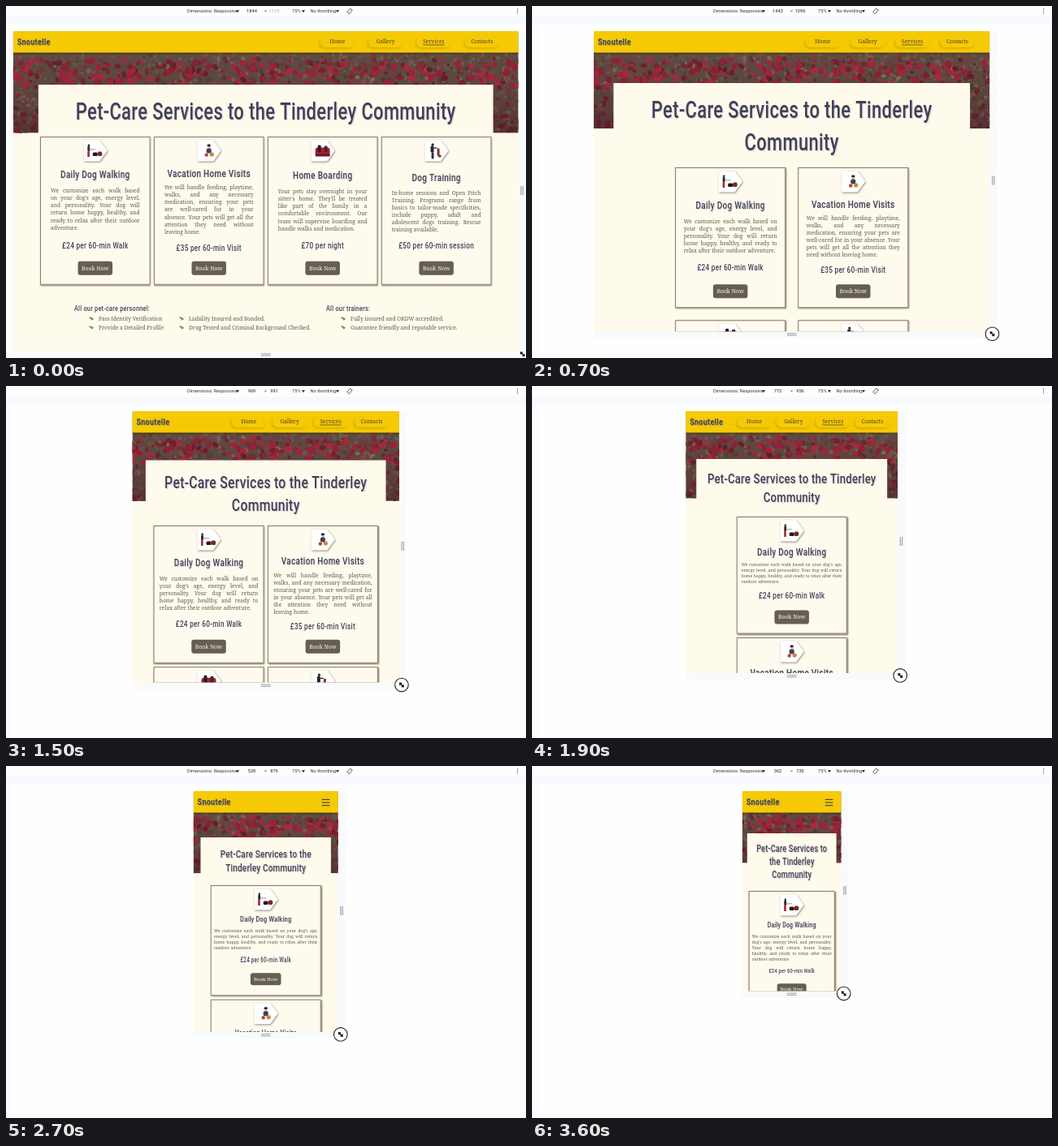
Write an HTML page with a canvas that moves like this. It is 640x434 px and loops after 3.7 s.

```html
<!DOCTYPE html>
<html lang="en">
<head>
<meta charset="utf-8">
<title>Responsive page resize</title>
<style>
html, body { margin: 0; width: 100%; height: 100%; overflow: hidden; background: #fff; }
canvas { display: block; width: 640px; height: 434px; }
</style>
</head>
<body>
<canvas id="stage"></canvas>
<script>
const STEP = 100, STEPS = 37, TOP = 31, MID = 319.7;
const INK = '#41405a', BODY = '#5f5949', CREAM = '#fefaec', YELLOW = '#f5ca05';
const SERIF = '"Noto Serif", serif', SANS = 'Roboto, "Liberation Sans", sans-serif';

const canvas = document.getElementById('stage');
const c = canvas.getContext('2d');
const dpr = window.devicePixelRatio || 1;
canvas.width = 640 * dpr;
canvas.height = 434 * dpr;

// Layout measures at a few viewport sizes; everything between is linear.
const FIELDS = ['k', 'W', 'H', 'w', 'panel', 'heroEnd', 'base', 'lead', 'size', 'gap',
  'titleSize', 'titleY', 'priceSize', 'priceGap', 'btnGap', 'inset'];
const KEYS = [
  [0, 1844, 1170, 622, 97, 156.5, 139.7, 40, 28.8, 21.4, 13, 51, 10.8, 23.2, 24.5, 13],
  [7, 1443, 1096, 487.5, 95, 151, 138, 40, 28.8, 21, 13, 51, 10.8, 21.8, 25.5, 10.5],
  [11, 1165, 1025, 396, 93, 145, 132, 32.5, 24.2, 18.5, 13, 51.5, 10.8, 22.8, 25.5, 8.5],
  [19, 772, 956, 261, 90, 138.5, 120, 23, 17.3, 18, 13, 48, 10.8, 18.5, 23.5, 6],
  [24, 600, 905, 202.5, 89, 134.5, 115, 18.5, 14.2, 17.5, 10.2, 45, 9.1, 16.5, 22, 5],
  [30, 455, 853, 154, 87, 130, 110, 16, 12.1, 17, 9.1, 44, 7.5, 16, 20, 3.5],
  [36, 362, 730, 122, 83, 119.5, 106, 16, 12.1, 16, 9.1, 44.5, 7.5, 15.5, 20.5, 4],
];

const HEADING = 'Pet-Care Services to the Tinderley Community';

// breaks: words per line, from the widest layout to the narrowest
const CARDS = [
  { title: 'Daily Dog Walking', price: '£24 per 60-min Walk', shift: [0, 0, 0],
    text: "We customize each walk based on your dog's age, energy level, and personality. Your dog will return home happy, healthy, and ready to relax after their outdoor adventure.",
    breaks: [[5, 6, 5, 5, 6], [6, 6, 5, 6], [6, 6, 5, 6], [9, 8, 9], [7, 6, 6, 7]] },
  { title: 'Vacation Home Visits', price: '£35 per 60-min Visit', shift: [-1.5, -4, 3],
    text: 'We will handle feeding, playtime, walks, and any necessary medication, ensuring your pets are well-cared for in your absence. Your pets will get all the attention they need without leaving home.',
    breaks: [[5, 4, 4, 5, 7, 4], [5, 4, 5, 6, 7], [5, 5, 6, 8, 5]] },
  { title: 'Home Boarding', price: '£70 per night', shift: [1, 1, 0],
    text: "Your pets stay overnight in your sitter's home. They'll be treated like part of the family in a comfortable environment. Our team will supervise boarding and handle walks and medication.",
    breaks: [[6, 5, 7, 3, 5]] },
  { title: 'Dog Training', price: '£50 per 60-min session', shift: [3.5, 2.2, 0.5],
    text: 'In-home sessions and Open Pitch Training. Programs range from basics to tailor-made specificities, include puppy, adult and adolescent dogs training. Rescue training available.',
    breaks: [[5, 4, 4, 4, 4]] },
];

// Icon parts: colour, x, y, width, height relative to the tag centre
const ICONS = [
  [['#222', -9, -8, 2.2, 2.6], ['#333', -9.5, -5.5, 3, 6], ['#b3202c', -9.5, 0.5, 2.6, 7],
   ['#777', -6.5, -2, 7, 0.7], ['#1d1b1b', -3, 2, 6, 4.5], ['#7a2a1c', 3, 1, 5.5, 5.5]],
  [['#2a2430', -2, -8, 4, 3], ['#e0b090', -1, -5, 3, 2], ['#39405c', -3, -3, 6, 6],
   ['#c23a2a', -5, 3, 4, 4], ['#c98a35', 1, 2, 5, 5]],
  [['#a81f31', -9, -4, 18, 10], ['#221d22', -6, -7, 4, 9], ['#3a2b2b', 2, -6, 4, 8],
   ['#6e1420', -9, 4, 18, 3]],
  [['#2b2326', -6, -9, 3, 3], ['#26262c', -7, -6, 4, 8], ['#34323f', -6, 2, 3, 8],
   ['#26262c', -3, -4, 4, 1.2], ['#7c3b22', 1, -3, 3, 9], ['#7c3b22', 2, 5, 4, 3]],
];

let seed = 7;
const rnd = () => (seed = seed * 16807 % 2147483647) / 2147483647;
const spots = (n, r, y, color) => Array.from({ length: n }, () =>
  ({ x: (rnd() - 0.5) * 640, y: y(), r: r * (0.5 + rnd()), color: color() }));
const MEADOW = [
  ...spots(1500, 2, () => rnd() * 100, () => `hsl(${rnd() * 45} 20% ${24 + rnd() * 18}%)`),
  ...spots(420, 2.6, () => 6 + rnd() * 94, () => `hsl(${345 + rnd() * 10} 58% ${24 + rnd() * 10}%)`),
  ...spots(210, 3.1, () => 8 + rnd() * 40, () => `hsl(${345 + rnd() * 8} 64% ${33 + rnd() * 9}%)`),
];

function layoutAt(k) {
  let i = 0;
  while (i < KEYS.length - 2 && k >= KEYS[i + 1][0]) i++;
  const a = KEYS[i], b = KEYS[i + 1], p = (k - a[0]) / (b[0] - a[0]);
  return Object.fromEntries(FIELDS.map((f, j) => [f, a[j] + (b[j] - a[j]) * p]));
}

function rect(x, y, w, h, fill) {
  c.fillStyle = fill;
  c.fillRect(x, y, w, h);
}

function pill(x, y, w, h, r, fill) {
  c.fillStyle = fill;
  c.beginPath();
  c.roundRect(x, y, w, h, r);
  c.fill();
}

function shadow(color, x, y, blur) {
  c.shadowColor = color;
  c.shadowOffsetX = x * dpr;
  c.shadowOffsetY = y * dpr;
  c.shadowBlur = blur * dpr;
}

function noShadow() { shadow('transparent', 0, 0, 0); }

function text(s, x, y, size, { color = BODY, align = 'left', font = SERIF } = {}) {
  c.font = `${size}px ${font}`;
  c.fillStyle = color;
  c.textAlign = align;
  c.fillText(s, x, y);
}

// Condensed display face
function display(s, x, y, size, { align = 'center', weight = 500, spacing = 0.035 } = {}) {
  c.save();
  c.translate(x, y);
  c.scale(0.76, 1);
  c.font = `${weight} ${size}px ${SANS}`;
  c.letterSpacing = size * spacing + 'px';
  c.textAlign = align;
  c.fillStyle = INK;
  c.fillText(s, 0, 0);
  c.restore();
}

function splitLines(s, counts) {
  const words = s.split(' ');
  const lines = counts.map(n => words.splice(0, n));
  return words.length ? [...lines, words] : lines;
}

function paragraph(lines, x, y, width, size, lead) {
  c.font = `${size}px ${SERIF}`;
  lines.forEach((words, i) => {
    const widths = words.map(w => c.measureText(w).width);
    const used = widths.reduce((a, b) => a + b, 0);
    const last = i === lines.length - 1;
    const space = last ? size * 0.27 : (width - used) / (words.length - 1);
    let px = x;
    words.forEach((w, j) => {
      text(w, px, y + i * lead, size);
      px += widths[j] + space;
    });
  });
}

function toolbar(L) {
  rect(0, 13, 640, 9, '#f6f9fd');
  rect(0, 22, 9, 412, '#fbfcfe');
  const font = SANS, color = '#333';
  const label = (s, x, col = color, align = 'left') => text(s, x, 8.4, 5.7, { color: col, align, font });
  const arrow = x => {
    c.fillStyle = color;
    c.beginPath();
    c.moveTo(x - 2, 5); c.lineTo(x + 2, 5); c.lineTo(x, 8.3);
    c.fill();
  };
  label('Dimensions: Responsive', 223);
  label(Math.round(L.W), 302.5, '#222', 'center');
  label('×', 319.5, '#555', 'center');
  label(Math.round(L.H), 330, L.k ? '#222' : '#aaa', 'center');
  label('75%', 352);
  label('No throttling', 374.5);
  [285, 366, 408].forEach(arrow);
  c.strokeStyle = '#444';
  c.lineWidth = 0.8;
  c.save();
  c.translate(423, 6.3);
  c.rotate(0.7);
  c.strokeRect(-1.7, -3, 3.4, 6);
  c.restore();
  [3.8, 6.2, 8.6].forEach(y => rect(629, y - 0.5, 1.1, 1.1, '#444'));
}

function handles(L) {
  const { right, bottom } = L;
  rect(right, TOP, 9, bottom - TOP + 8, '#f9fafc');
  rect(L.left, bottom, L.w + 9, 8, '#f9fafc');
  const y = (TOP + bottom) / 2 - 1;
  rect(right + 2.5, y - 5.5, 1.3, 11, '#a9abb2');
  rect(right + 4.8, y - 5.5, 1.3, 11, '#a9abb2');
  rect(MID - 6, bottom + 2, 12, 1.2, '#a9abb2');
  rect(MID - 6, bottom + 4.2, 12, 1.2, '#a9abb2');
}

function cursor(L) {
  c.save();
  c.translate(L.right + (L.k ? 3 : 5), L.bottom + 3);
  if (L.k) {
    c.beginPath();
    c.arc(0, 0, 8.3, 0, Math.PI * 2);
    c.fillStyle = '#fff';
    c.fill();
    c.strokeStyle = '#222';
    c.lineWidth = 1.1;
    c.stroke();
  }
  c.rotate(Math.PI / 4);
  c.fillStyle = '#111';
  for (const s of [-1, 1]) {
    c.beginPath();
    c.moveTo(s * 4.2, 0); c.lineTo(s * 1.2, -2.4); c.lineTo(s * 1.2, 2.4);
    c.fill();
  }
  c.fillRect(-2, -0.7, 4, 1.4);
  c.restore();
}

function hero(L) {
  const top = 57, h = L.heroEnd - top;
  c.save();
  c.beginPath();
  c.rect(L.left, top, L.w, h);
  c.clip();
  rect(L.left, top, L.w, h, '#5d4841');
  for (const s of MEADOW) {
    c.fillStyle = s.color;
    c.beginPath();
    c.ellipse(MID + s.x, top + s.y * h / 100, s.r * 1.2, s.r * 0.85, s.x, 0, Math.PI * 2);
    c.fill();
  }
  // The picture darkens towards its lower edge
  const shade = c.createLinearGradient(0, top, 0, L.heroEnd);
  shade.addColorStop(0, 'rgba(110,95,85,.3)');
  shade.addColorStop(0.25, 'rgba(90,50,50,0)');
  shade.addColorStop(1, 'rgba(75,28,36,.5)');
  rect(L.left, top, L.w, h, shade);
  c.restore();
}

function nav(L) {
  shadow('rgba(40,25,0,.55)', 0, 1, 2);
  rect(L.left, TOP, L.w, 26.5, YELLOW);
  shadow('rgba(120,110,90,.45)', 0.8, 0.8, 0.8);
  display('Snoutelle', L.left + 5, 48.4, 11.8, { align: 'left', weight: 700 });
  noShadow();
  if (L.W < 768) {
    [40.8, 44.4, 48].forEach(y => rect(L.right - 20, y, 9.6, 1.2, '#4b4353'));
    return;
  }
  const pitch = 48.4 + 0.0102 * (L.W - 772);
  const end = L.right - 31.5 - 0.0126 * (L.W - 772);
  ['Home', 'Gallery', 'Services', 'Contacts'].forEach((s, i) => {
    const x = end - (3 - i) * pitch;
    shadow('rgba(150,110,0,.35)', -1, 1.5, 3);
    pill(x - 21, 38, 42, 13, 6, YELLOW);
    noShadow();
    text(s, x, 46.2, 6.7, { color: '#4b4230', align: 'center' });
    if (i === 2) rect(x - 13, 47.6, 26, 0.8, '#4b4230');
  });
}

function icon(i, x, y) {
  c.save();
  c.translate(x, y);
  c.beginPath();
  [[-14, -13], [5.5, -13], [15, 0], [5.5, 13], [-14, 13]].forEach(p => c.lineTo(...p));
  c.closePath();
  shadow('rgba(70,60,45,.6)', 0.7, 1, 2.2);
  c.fillStyle = '#fff';
  c.fill();
  noShadow();
  for (const [color, px, py, w, h] of ICONS[i]) pill(px, py, w, h, Math.min(w, h) / 3, color);
  c.restore();
}

function card(i, x, y, w, L, mode, height, btnY) {
  const d = CARDS[i], mid = x + w / 2, big = mode < 3;
  const [dTitle, dText, dPrice] = big ? d.shift : [0, 0, 0];
  shadow('rgba(60,50,35,.7)', 0.8, 1, 1.8);
  rect(x, y, w, height, '#fefbee');
  noShadow();
  c.strokeStyle = '#857a64';
  c.lineWidth = 1;
  c.strokeRect(x + 0.5, y + 0.5, w - 1, height - 1);

  icon(i, mid, y + 17.5);
  shadow('rgba(150,145,165,.35)', 0.8, 0.8, 0.8);
  display(d.title, mid, y + L.titleY + dTitle, L.titleSize);
  noShadow();

  const lead = big ? 9.05 : 7, size = big ? 6.6 : 5.05;
  const lines = splitLines(d.text, d.breaks[Math.min(mode, d.breaks.length - 1)]);
  paragraph(lines, x + L.inset, y + L.textY + dText, w - 2 * L.inset, size, lead);
  display(d.price, mid, y + btnY - L.btnGap + dPrice, L.priceSize);

  const k = Math.min(1, 0.5 + L.priceSize / 21.6), bw = 42.5 * k, bh = 17 * k;
  pill(mid - bw / 2, y + btnY - bh / 2, bw, bh, 3, '#655e54');
  text('Book Now', mid, y + btnY + 2.3 * k, 6.9 * k, { color: '#fdf8e8', align: 'center' });
}

function footer(y) {
  display('All our pet-care personnel:', 84, y, 9.6, { align: 'left' });
  display('All our trainers:', 394, y, 9.6, { align: 'left' });
  const lists = [
    [114, 'Pass Identity Verification', 'Provide a Detailed Profile'],
    [225, 'Liability Insured and Bonded.', 'Drug Tested and Criminal Background Checked.'],
    [424, 'Fully insured and OKDW accredited.', 'Guarantee friendly and reputable service.'],
  ];
  for (const [x, ...rows] of lists) {
    rows.forEach((s, i) => {
      const by = y + 11.8 + i * 11;
      text(s, x, by, 6.6);
      c.fillStyle = '#8d8371';
      c.beginPath();
      c.ellipse(x - 9.5, by - 2.8, 2.4, 1.1, 0.4, 0, Math.PI * 2);
      c.ellipse(x - 7.8, by - 1.5, 1.7, 1.2, -0.5, 0, Math.PI * 2);
      c.fill();
    });
  }
}

function page(L) {
  const { W, w } = L;
  const mode = W > 1700 ? 0 : W > 1300 ? 1 : W >= 920 ? 2 : W >= 400 ? 3 : 4;
  const cols = [4, 2, 2, 1, 1][mode];
  L.textY = L.titleY + (mode < 3 ? 18.2 : 13);

  c.save();
  c.beginPath();
  c.rect(L.left, TOP, w, L.bottom - TOP);
  c.clip();
  rect(L.left, TOP, w, L.bottom - TOP, CREAM);
  hero(L);
  nav(L);
  rect(L.left + w * 0.05, L.panel, w * 0.9, L.bottom, CREAM);

  const counts = W > 1600 ? [6] : W >= 700 ? [5, 1] : W >= 410 ? [4, 2] : [3, 2, 1];
  const lines = splitLines(HEADING, counts);
  shadow('rgba(150,145,165,.4)', 1, 1, 1);
  lines.forEach((words, i) =>
    display(words.join(' '), MID, L.base + i * L.lead, L.size, { spacing: 0.018 }));
  noShadow();

  const top = L.base + (lines.length - 1) * L.lead + L.gap;
  const pitch = cols === 4 ? w * 0.225 : Math.max(140.4, w * 0.31);
  const cardW = cols === 4 ? pitch - 4.3 : Math.min(136, w * 0.87);
  const textH = CARDS[0].breaks[mode].length * (mode < 3 ? 9.05 : 7);
  const btnY = L.textY + textH + L.priceGap + L.btnGap;
  const height = btnY + 20.5;
  const rowGap = cols === 2 ? pitch - cardW : 4.5;
  CARDS.forEach((_, i) => {
    const x = MID + (i % cols - (cols - 1) / 2) * pitch - cardW / 2;
    const y = top + Math.floor(i / cols) * (height + rowGap);
    if (y < L.bottom) card(i, x, y, cardW, L, mode, height, btnY);
  });
  if (cols === 4) footer(top + height + 32);
  c.restore();
}

function draw(now) {
  const L = layoutAt(Math.floor(now / STEP) % STEPS);
  L.left = MID - L.w / 2;
  L.right = MID + L.w / 2;
  L.bottom = TOP + L.H * 0.3378;
  c.setTransform(dpr, 0, 0, dpr, 0, 0);
  rect(0, 0, 640, 434, '#fefefe');
  toolbar(L);
  handles(L);
  page(L);
  cursor(L);
}

const start = performance.now();
function tick() {
  draw(performance.now() - start);
  requestAnimationFrame(tick);
}
tick();
</script>
</body>
</html>
```
